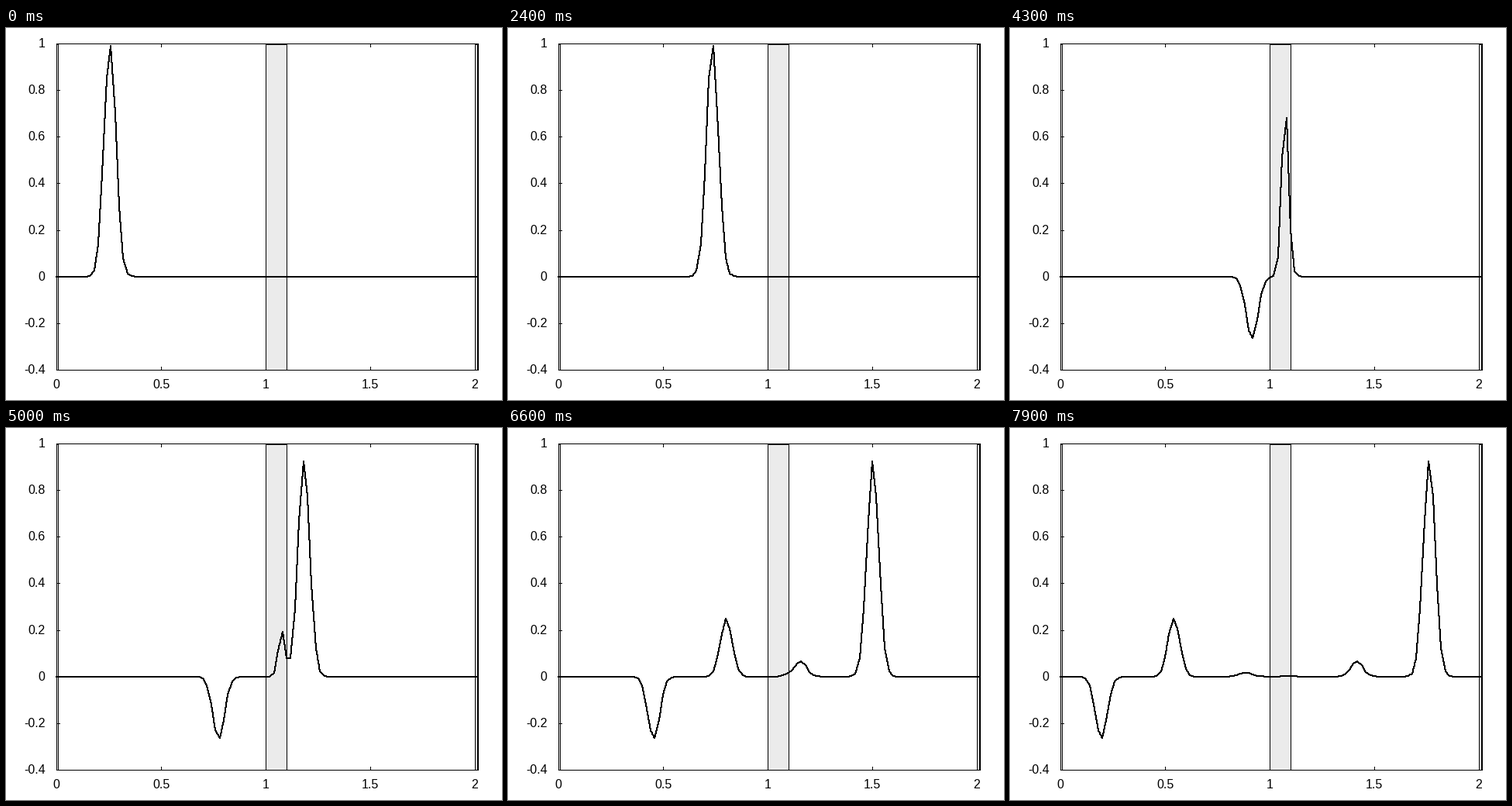
A matplotlib script for the animation above (8000 ms loop, 640 by 480 pixels).

```python
import numpy as np
import matplotlib.pyplot as plt
from matplotlib.animation import FuncAnimation

FRAMES, INTERVAL = 80, 100
W, H = 640, 480
LEFT, RIGHT, TOP, BOTTOM = 65, 609, 20, 441
FONT = 16 * 0.72  # 16 px in points at 100 dpi
GRAY = "#ebebeb"

# Gaussian pulse meeting a dielectric slab (relative permittivity 3)
START, STEP, WIDTH = 0.2562, 0.02, 0.04
FRONT, DEPTH = 1.016, 0.1
N = np.sqrt(3)
R = (N - 1) / (N + 1)
LAP = 2 * N * DEPTH
ECHOES = range(4)

plt.rcParams["font.family"] = "Liberation Sans"


def to_px(x):
    return np.floor(LEFT + 270 * x + 0.5)


def to_py(y):
    return BOTTOM - np.floor((y + 0.4) * (BOTTOM - TOP) / 1.4 + 0.5)


def field(x, center):
    def g(path):
        return np.exp(-((path - center) / WIDTH) ** 2)

    through = 1 - R ** 2
    before = g(x) - R * g(2 * FRONT - x)
    inside = np.zeros_like(x)
    after = np.zeros_like(x)
    depth = N * (x - FRONT)
    for m in ECHOES:
        gain, lag = R ** (2 * m), m * LAP
        before += through * gain * R * g(2 * FRONT - x + LAP + lag)
        inside += (1 - R) * gain * (g(FRONT + depth + lag)
                                    + R * g(FRONT + LAP - depth + lag))
        after += through * gain * g(x + (N - 1) * DEPTH + lag)
    return np.where(x < FRONT, before,
                    np.where(x < FRONT + DEPTH, inside, after))


def stroke(px, py):
    """Draw a hard-edged polyline with a 2 x 2 pixel brush."""
    layer = np.zeros((H, W, 4))
    for x0, y0, x1, y1 in zip(px, py, px[1:], py[1:]):
        count = int(max(abs(x1 - x0), abs(y1 - y0))) + 1
        cols = np.rint(np.linspace(x0, x1, count)).astype(int)
        rows = np.rint(np.linspace(y0, y1, count)).astype(int)
        for dx in (-1, 0):
            for dy in (-1, 0):
                layer[rows + dy, cols + dx, 3] = 1
    return layer


fig = plt.figure(figsize=(W / 100, H / 100), dpi=100, facecolor="white")
ax = fig.add_axes([0, 0, 1, 1])
ax.set_xlim(0, W)
ax.set_ylim(H, 0)
ax.axis("off")


def block(x0, y0, x1, y1, color="black"):
    """Fill whole pixels from (x0, y0) to (x1, y1), both included."""
    ax.add_patch(plt.Rectangle((x0, y0), x1 - x0 + 1, y1 - y0 + 1,
                               fc=color, lw=0, aa=False))


def box(x0, y0, x1, y1, fill):
    block(x0, y0, x1, y1)
    block(x0 + 1, y0 + 1, x1 - 1, y1 - 1, fill)


box(LEFT, TOP, RIGHT, BOTTOM, "white")
for x0, x1 in ((LEFT, 67), (335, 362), (605, RIGHT - 1)):
    box(x0, TOP + 1, x1, BOTTOM, GRAY)

for v in (0, 0.5, 1, 1.5, 2):
    x = to_px(v)
    block(x, TOP, x, TOP + 4)
    block(x, BOTTOM - 4, x, BOTTOM)
    ax.text(x, 465, f"{v:g}", fontsize=FONT, ha="center", va="baseline")

for v in np.arange(-2, 6) / 5:
    y = to_py(v)
    block(LEFT, y, LEFT + 4, y)
    ax.text(50.5, y + 5, f"{v:g}", fontsize=FONT, ha="right", va="baseline")

xs = np.arange(102) * 0.02
px = np.minimum(to_px(xs), RIGHT)
wave = ax.imshow(np.zeros((H, W, 4)), extent=(0, W, H, 0), aspect="auto",
                 interpolation="nearest", zorder=4)


def update(i):
    wave.set_data(stroke(px, to_py(field(xs, START + STEP * i))))
    return wave,


anim = FuncAnimation(fig, update, frames=FRAMES, interval=INTERVAL,
                     repeat=True, repeat_delay=0)
plt.show()
```
